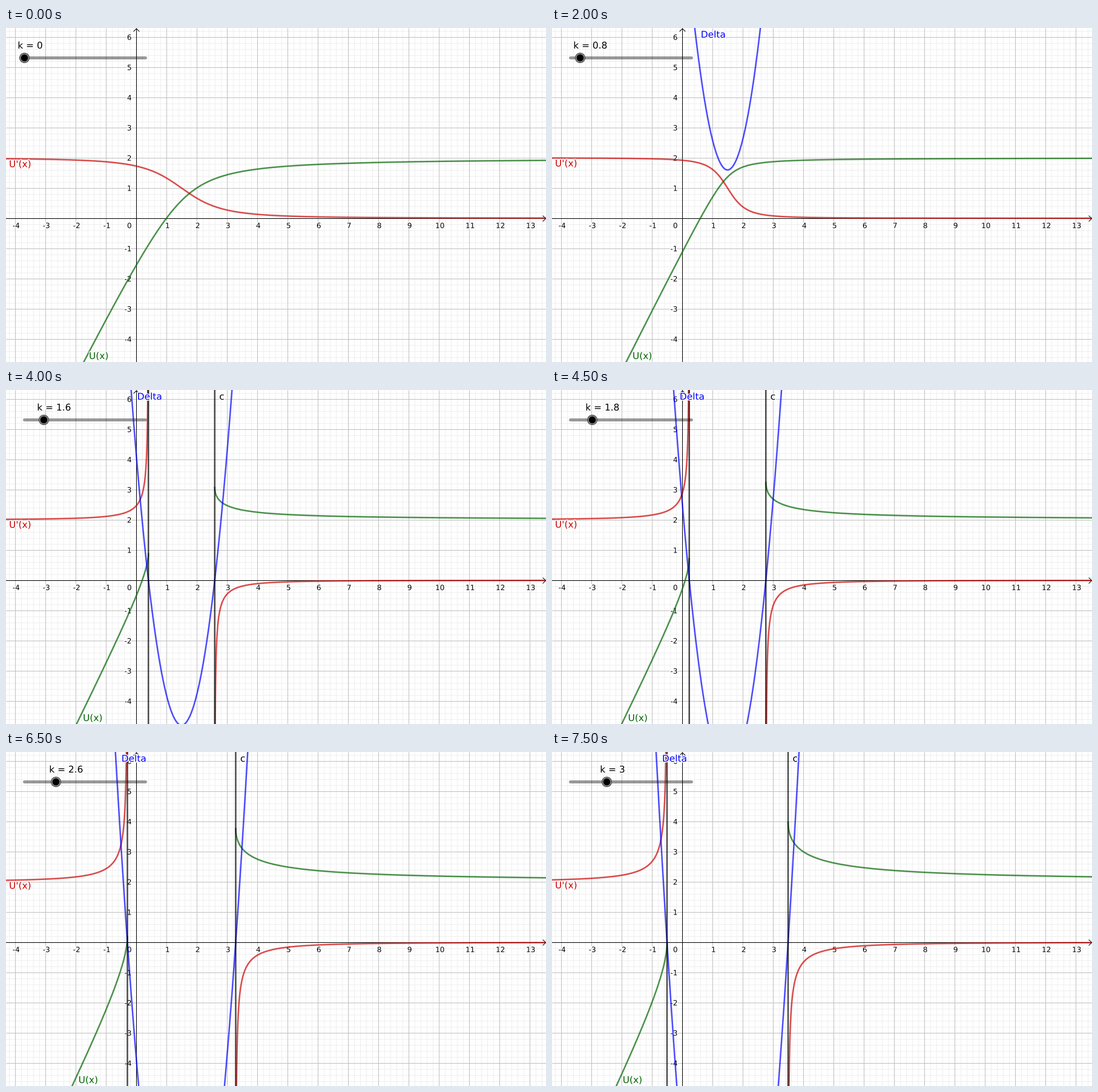
These frames come from a looping animation (892 px wide and 553 px high, 8 s). A matplotlib script:

```python
import numpy as np
import matplotlib.pyplot as plt
from matplotlib.animation import FuncAnimation
from matplotlib.patches import Circle
from matplotlib.patheffects import withStroke

W, H = 892, 553
X0, Y0, UNIT = 215, 315, 50
FRAMES, STEP = 16, 500
RED, GREEN, BLUE, BLACK = "#cc0000", "#006400", "#0000ff", "#000000"
HALO = [withStroke(linewidth=3, foreground="white")]

plt.rcParams["font.family"] = "DejaVu Sans"
plt.rcParams["toolbar"] = "None"
fig = plt.figure(figsize=((W + 1e-6) / 72, (H + 1e-6) / 72), dpi=72, facecolor="white")
ax = fig.add_axes([0, 0, 1, 1])
ax.set_xlim(0, W)
ax.set_ylim(H, 0)
ax.axis("off")


def px(x):
    return X0 + UNIT * np.asarray(x)


def py(y):
    return Y0 - UNIT * np.asarray(y)


def delta(x, k):
    return (2 * x - 3) ** 2 + 8 * (1 - k)


def utility(x, k):
    return (2 * x + 1 - np.sqrt(delta(x, k))) / 2


def marginal(x, k):
    return 1 - (2 * x - 3) / np.sqrt(delta(x, k))


def draw_grid():
    for gap, color, z in ((UNIT // 5, "#efefef", 0), (UNIT, "#c0c0c0", 0.5)):
        ax.vlines(np.arange(X0 % gap, W, gap), 0, H, colors=color, lw=1, zorder=z)
        ax.hlines(np.arange(Y0 % gap, H, gap), 0, W, colors=color, lw=1, zorder=z)


def tick(x, y, n, ha):
    ax.text(x, y, str(n), fontsize=12, ha=ha, va="baseline",
            path_effects=HALO, zorder=1)


def draw_axes():
    for n in range(-4, 14):
        if n:
            tick(px(n) + 1.7, 331.3, n, "center")
    tick(207.5, 331.3, 0, "right")
    for n in range(-4, 7):
        if n:
            tick(207.5, py(n) + 4.6, n, "right")
    pen = dict(color=BLACK, lw=1, zorder=1.5)
    ax.plot([0, W], [Y0, Y0], **pen)
    ax.plot([X0, X0], [1, H], **pen)
    cx, cy = X0 + 0.5, Y0 + 0.5
    ax.plot([W - 5, W - 0.5, W - 5], [cy - 4.5, cy, cy + 4.5], **pen)
    ax.plot([cx - 4.5, cx, cx + 4.5], [5.5, 1, 5.5], **pen)


def curve(color, z):
    return ax.plot([], [], color=color, alpha=0.7, lw=2.5, zorder=z,
                   solid_capstyle="butt", snap=False)[0]


def label(text, color, z=6):
    return ax.text(0, 0, text, color=color, fontsize=15.4, va="baseline",
                   path_effects=HALO, zorder=z)


draw_grid()
draw_axes()

ax.plot([30.5, 230.5], [49.5, 49.5], color=BLACK, alpha=0.4, lw=5,
        solid_capstyle="round", snap=False, zorder=2)
ring = ax.add_patch(Circle((0, 0), 8, fc="#8c8c8c", ec="#404040", lw=1, zorder=2.1))
knob = ax.add_patch(Circle((0, 0), 5.8, fc=BLACK, ec="none", zorder=2.2))

u_line, m_line = curve(GREEN, 3), curve(RED, 3.1)
d_line = curve(BLUE, 3.2)
roots = [curve(BLACK, 3.3) for _ in range(2)]

k_text = label("", BLACK)
u_text, m_text = label("U(x)", GREEN), label("U'(x)", RED)
c_texts = [label("c", BLACK) for _ in roots]
d_text = label("Delta", BLUE, 7)

LEFT, RIGHT = -4.4, 13.6
TOP, BOTTOM = Y0 / UNIT, (Y0 - H) / UNIT
spread = np.linspace(1e-4, 1, 500) ** 2
d_xs = np.linspace(-3, 6, 700)


def domain(k):
    """Sample points, dense near the roots of delta, with a gap between them."""
    if k < 1:
        return np.linspace(LEFT, RIGHT, 1200)
    r = np.sqrt(2 * (k - 1))
    lo, hi = 1.5 - r, 1.5 + r
    left = lo - (lo - LEFT) * spread[::-1]
    right = hi + (RIGHT - hi) * spread
    return np.concatenate([left, [np.nan], right])


def update(i):
    k = i / 5
    xs = domain(k)
    u_line.set_data(px(xs), py(utility(xs, k)))
    m_line.set_data(px(xs), py(marginal(xs, k)))
    d_line.set_data(px(d_xs), py(delta(d_xs, k)))

    r = np.sqrt(max(0, 2 * (k - 1)))
    for sign, line, text in zip((-1, 1), roots, c_texts):
        shown = k > 1 or (k == 1 and sign > 0)
        x = px(1.5 + sign * r)
        line.set_data([x, x], [0, H])
        line.set_visible(shown)
        text.set_position((x + 7.5, 16))
        text.set_visible(shown)

    # labels sit where each curve meets the edge of the view
    gap = TOP - 8 * (1 - k)
    d_text.set_visible(gap > 0)
    d_text.set_position((px(1.5 - np.sqrt(max(gap, 0)) / 2) + 10, 16))
    a = 1 - 2 * BOTTOM
    u_x = px((17 - 8 * k - a * a) / (2 * a + 6) / 2) + 11.5
    u_text.set_position((min(u_x, 138) - 1, 548))
    m_text.set_position((5, py(marginal(-4.3, k)) + 14))

    slide = 30.5 + 20 * k
    ring.center = knob.center = (slide, 49.5)
    k_text.set_text(f"k = {k:g}")
    k_text.set_position((slide - 11.2, 34))
    return []


anim = FuncAnimation(fig, update, frames=FRAMES, init_func=lambda: update(0),
                     interval=STEP, repeat=True, repeat_delay=0, blit=False)
plt.show()
```
